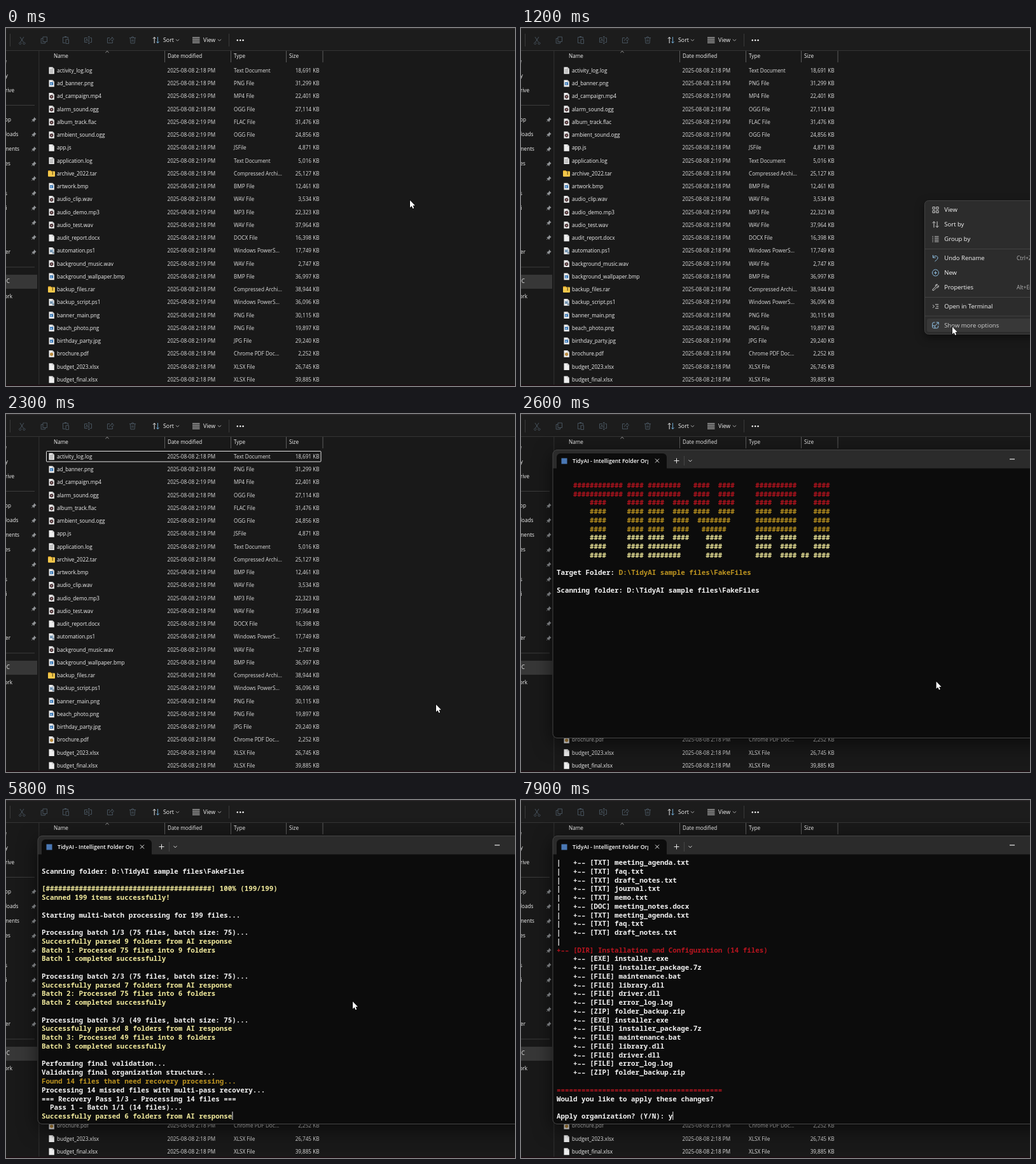
An HTML page with a canvas for the animation above (8000 ms loop, 800 by 563 pixels).

```html
<!DOCTYPE html>
<html lang="en">
<head>
<meta charset="utf-8">
<title>Folder organizer</title>
<style>
  html, body { margin: 0; width: 100%; height: 100%; overflow: hidden; background: #191919; }
  canvas { display: block; width: 800px; height: 563px; }
</style>
</head>
<body>
<canvas id="stage"></canvas>
<script>
const W = 800, H = 563, LOOP = 8000;
const UI = '"Open Sans", "Noto Sans", sans-serif';
const MONO = '"Noto Sans Mono", "DejaVu Sans Mono", monospace';
const canvas = document.getElementById('stage');
const ctx = canvas.getContext('2d');
const dpr = window.devicePixelRatio || 1;
canvas.width = W * dpr;
canvas.height = H * dpr;

// When things happen, in ms
const MENU_IN = 300, HOVER_IN = 1000, MENU_OUT = 2100;
const WINDOW_IN = 2400, TEXT_IN = 2500, BAR = [2700, 2880];
const PARSED = 5500, TREE = [6000, 6600], ANSWER = 7400;

// ---- drawing helpers ----
function rect(x, y, w, h, color) {
  ctx.fillStyle = color;
  ctx.fillRect(x, y, w, h);
}

function round(x, y, w, h, r, fill, stroke) {
  ctx.beginPath();
  ctx.roundRect(x, y, w, h, r);
  if (fill) { ctx.fillStyle = fill; ctx.fill(); }
  if (stroke) { ctx.strokeStyle = stroke; ctx.lineWidth = 1; ctx.stroke(); }
}

function path(d, color, width = 1, x = 0, y = 0) {
  ctx.save();
  ctx.translate(x, y);
  ctx.strokeStyle = color;
  ctx.lineWidth = width;
  ctx.stroke(new Path2D(d));
  ctx.restore();
}

function dot(x, y, r, color) {
  ctx.beginPath();
  ctx.arc(x, y, r, 0, Math.PI * 2);
  ctx.fillStyle = color;
  ctx.fill();
}

// y is the middle of the text line
function label(s, x, y, size = 8.2, color = '#f2f2f2', align = 'left', weight = 400) {
  ctx.font = `${weight} ${size}px ${UI}`;
  ctx.textAlign = align;
  ctx.fillStyle = color;
  ctx.fillText(s, x, y + size * 0.36);
}

const chevron = (x, y, color) => path('M-2.5,-1.2L0,1.3L2.5,-1.2', color, 1, x, y);

// ---- file list: name, minute, type, size in KB ----
const files = `activity_log.log|18|Text Document|18,691
ad_banner.png|18|PNG File|31,299
ad_campaign.mp4|19|MP4 File|22,401
alarm_sound.ogg|18|OGG File|27,114
album_track.flac|19|FLAC File|31,476
ambient_sound.ogg|19|OGG File|24,856
app.js|18|JSFile|4,871
application.log|19|Text Document|5,016
archive_2022.tar|18|Compressed Archi...|25,127
artwork.bmp|18|BMP File|12,461
audio_clip.wav|18|WAV File|3,534
audio_demo.mp3|19|MP3 File|22,323
audio_test.wav|18|WAV File|37,964
audit_report.docx|18|DOCX File|16,398
automation.ps1|18|Windows PowerS...|17,749
background_music.wav|19|WAV File|2,747
background_wallpaper.bmp|18|BMP File|36,997
backup_files.rar|18|Compressed Archi...|38,944
backup_script.ps1|19|Windows PowerS...|36,096
banner_main.png|18|PNG File|30,115
beach_photo.png|18|PNG File|19,897
birthday_party.jpg|19|JPG File|29,240
brochure.pdf|18|Chrome PDF Doc...|2,252
budget_2023.xlsx|18|XLSX File|26,745
budget_final.xlsx|18|XLSX File|39,885`.split('\n').map(s => s.split('|'));

function fileIcon(name, y) {
  const ext = name.split('.').pop();
  if (/tar|rar/.test(ext)) {
    round(66, y - 5, 5, 4, 1, '#d99a1e');
    round(66, y - 3.7, 11, 8.4, 1, '#f3c84b');
    rect(72.6, y - 3.7, 1.4, 5.5, '#7d6320');
    return;
  }
  ctx.fillStyle = '#eeeeee';
  ctx.fill(new Path2D(`M67.5,${y - 5.5}h5.7l2.6,2.6v8.2h-8.3z`));
  path(`M73,${y - 5.3}v2.5h2.6`, '#a8a8a8', 0.7);
  if (ext === 'log') {
    for (let i = 0; i < 4; i++) rect(69, y - 2.6 + i * 1.8, 5.2, 0.8, '#8a8a8a');
  } else if (/png|bmp|jpg/.test(ext)) {
    rect(69, y - 2, 5.2, 4.6, '#3b78b5');
    rect(70, y - 0.2, 2, 1.6, '#b9d8f0');
  } else if (/mp|ogg|flac|wav/.test(ext)) {
    dot(71.6, y + 0.6, 2.8, '#493236');
    dot(71.6, y + 0.6, 0.9, '#e8c4bc');
  } else if (ext === 'ps1') {
    rect(69, y - 2, 5.4, 4.4, '#8aa9c4');
    path(`M70,${y - 1}l1.6,1.3l-1.6,1.3`, '#33506b', 0.8);
    dot(74.4, y + 3, 1.7, '#7f95a8');
  } else if (ext === 'pdf') {
    dot(71.6, y + 0.6, 2.6, '#b8893c');
  }
}

function toolbar() {
  const dim = '#46525c', lit = '#e6e6e6';
  rect(0, 0, W, 36, '#1c1c1c');
  rect(0, 0, W, 1.4, '#2c292b');
  rect(0, 35, W, 1, '#343434');
  path('M-3,-5L2.2,3M3,-5L-2.2,3M-1.6,4a1.6,1.6 0 1 1-.1-.1M4.6,4a1.6,1.6 0 1 1-.1-.1', dim, 1, 25, 19);
  path('M-2,-5h6.5v7.5h-6.5zM-2,-2.5h-2.8v7.5h6.3v-2.5', dim, 1, 60, 19);
  path('M-1,4.5h-3.5v-9h8v3M-2,-5.5h3M0,-1h4.5v6.5h-4.5z', dim, 1, 94, 19);
  path('M-1,3.5h-4.5v-7h4.5M3,-3.5h2.5v7h-2.5M-3.6,2l1.8,-4l1.8,4M1.3,-5.5v11M0,-5.5h2.6M0,5.5h2.6', dim, 1, 129, 19);
  path('M-1,-3.5h-3.5v8h8v-2.5M-1.5,1.5q.5,-4 4,-4v-2.3l3,3.3l-3,3.2v-2', dim, 1, 164, 19);
  path('M-5,-3.5h10M-1.8,-3.6q0,-1.8 1.8,-1.8t1.8,1.8M-3.8,-3.4l.8,8.4h6l.8,-8.4M-1,-1v3.5M1,-1v3.5', dim, 1, 199, 19);
  for (const x of [6, 350]) rect(x, 9, 1, 20, '#3a3a3a');

  path('M-2.8,5v-9.5M-5,-2.2l2.2,-2.4l2.2,2.4', lit, 1, 236, 19);
  path('M2.5,-5v9.5M.3,2.4l2.2,2.4l2.2,-2.4', '#6fa8d0', 1, 236, 19);
  label('Sort', 247, 19, 8.8, '#f4f4f4');
  chevron(269.5, 19, '#aaa');
  for (let i = 0; i < 4; i++) rect(293, 14.5 + i * 2.7, 11.5, 1, lit);
  label('View', 310, 19, 8.8, '#f4f4f4');
  chevron(335.5, 19, '#aaa');
  for (const x of [363.8, 368.2, 372.6]) dot(x, 19.3, 1.2, '#fff');
}

// Visible right ends of the sidebar labels: text, right edge, y
const side = [['e', 1, 52], ['y', 3, 75], ['rive', 13, 98], ['op', 8, 144], ['loads', 19.5, 167],
  ['ments', 21, 190], ['es', 7, 213], ['s', 2, 260], ['i', 1.5, 283], ['er', 7, 352], ['C', 6, 398], ['ork', 10, 422]];

function sidebar() {
  rect(0, 388, 49, 22, '#373737');
  rect(0, 121, 45, 1, '#3c3c3c');
  rect(0, 375.5, 45, 1, '#3c3c3c');
  for (const [s, x, y] of side) label(s, x, y, 8.2, '#f2f2f2', 'right');
  for (let i = 0; i < 10; i++) {
    const y = 144 + i * 23.15;
    ctx.fillStyle = '#909396';
    ctx.fill(new Path2D(`M44,${y - 4}l3.6,3.6l-1.2,.6l-1.5,1.8l-.6,2l-4,-4l2,-.6l1.7,-1.6z`));
    path(`M42.5,${y + 1.3}L40.3,${y + 3.6}`, '#909396', 0.9);
  }
  rect(51.3, 36, 1, H - 36, '#333');
}

function explorer(t) {
  rect(0, 0, W, H, '#191919');
  toolbar();
  sidebar();
  [['Name', 75], ['Date modified', 254], ['Type', 358], ['Size', 445]].forEach(([s, x]) => label(s, x, 44.5));
  for (const x of [249, 353, 440, 497.5]) rect(x, 36, 1, 18, '#5c5c5c');
  path('M-2.6,1.3L0,-1.2L2.6,1.3', '#999', 1, 159, 37.5);
  files.forEach(([name, min, type, size], i) => {
    const y = 67 + i * 20.25;
    fileIcon(name, y);
    label(name, 80, y);
    label(`2025-08-08 2:${min} PM`, 253.5, y, 8.2, '#e0e0e0');
    label(type, 358, y, 8.2, '#e0e0e0');
    label(size + ' KB', 492.5, y, 8.2, '#e0e0e0', 'right');
  });
  if (t >= MENU_OUT) round(63.5, 58.5, 431.5, 16.5, 1, null, '#e4e4e4');
  rect(0, 561, W, 2, '#1d1014');
}

// ---- context menu ----
const menuItems = [
  ['View', 286, 'M-4.5,-4.5h3.4v3.4h-3.4zM1.2,-4.5h3.4v3.4h-3.4zM-4.5,1.2h3.4v3.4h-3.4zM1.2,1.2h3.4v3.4h-3.4z'],
  ['Sort by', 309, 'M-2.5,4.8v-9.3M-4.8,-2.2l2.3,-2.4l2.3,2.4M2.6,-4.8v9.3M.3,2.2l2.3,2.4l2.3,-2.4'],
  ['Group by', 332, 'M-1.5,-4h6.5M-1.5,-1.3h6.5M-1.5,1.4h6.5M-1.5,4h6.5M-5,-4h1.5M-5,-1.3h1.5M-5,1.4h1.5M-5,4h1.5'],
  ['Undo Rename', 362, 'M-4,-5v4.2h4.2M-4,-1c2,-3.5 8,-3.5 7.5,1c-.3,2 -2.5,3 -4.5,5', 'Ctrl+Z'],
  ['New', 385, 'M5,0a5,5 0 1 1 0,-.1M-2.4,0h4.8M0,-2.4v4.8'],
  ['Properties', 408, 'M-4.5,3L0,-1.2c-.8,-2.6 1,-4.2 3.2,-3.5l-1.8,2l1.6,1.5l2,-1.7c.5,2.2 -1.4,4 -3.6,3.2l-4.2,4.4q-2.4,.6 -1.7,-1.7', 'Alt+Enter'],
  ['Open in Terminal', 438, 'M-4.5,-2.5l2.6,2.3l-2.6,2.3M-.5,2.8h5.2M-.5,-3.2h5.2M1.2,-.2h3.5'],
  ['Show more options', 467.5, 'M-1,-4.5h-1.8q-2,0 -2,2v5q0,2 2,2h5q2,0 2,-2v-1.8M1.2,-4.6h3.6v3.6M4.7,-4.5L-.8,1M-4.5,.7h3.6v3.8']
];
const blueIcons = ['Undo Rename', 'New', 'Show more options'];

function contextMenu(t) {
  ctx.save();
  ctx.shadowColor = 'rgba(0,0,0,.5)';
  ctx.shadowBlur = 14 * dpr;
  ctx.shadowOffsetY = 5 * dpr;
  round(634.5, 271.5, 190, 210, 6, '#2c2c2c');
  ctx.restore();
  round(634.5, 271.5, 190, 210, 6, null, '#424242');
  if (t >= HOVER_IN) round(638, 457, 180, 21, 3, '#383838');
  for (const y of [347, 423, 452.5]) rect(635, y, 165, 1, '#424242');
  for (const [s, y, icon, key] of menuItems) {
    path(icon, blueIcons.includes(s) ? '#8fc0e4' : '#cfcfcf', 1, 651.5, y);
    label(s, 665.3, y, 9.5, s === 'Show more options' && t >= HOVER_IN ? '#d0d0d0' : '#f8f8f8');
    if (key) label(key, 779, y, 8.5, '#b4b4b4');
  }
}

// ---- terminal ----
const CELL = 6.51, LINE = 13.76, LEFT = 56, ROWS = 30;
const tint = { w: '#f2f2f2', y: '#f2eb9d', d: '#bd9420', r: '#b8141f' };
const FOLDER = 'D:\\TidyAI sample files\\FakeFiles';

const banner = [
  '    ############ #### ########   ####  ####     ##########    ####',
  '    ############ #### ########   ####  ####     ##########    ####',
  '        ####     #### ####  #### ####  ####     ####  ####    ####',
  '        ####     #### ####  #### ####  ####     ####  ####    ####',
  '        ####     #### ####  ####  ########      ##########    ####',
  '        ####     #### ####  ####   ######       ##########    ####',
  '        ####     #### ####  ####    ####        ####  ####    ####',
  '        ####     #### ########      ####        ####  ####    ####',
  '        ####     #### ########      ####        ####  #### ## ####'
].map((s, i) => 'rdy'[Math.floor(i / 3)] + s);

const batch = (n, size, parsed, made) => [
  `wProcessing batch ${n}/3 (${size} files, batch size: 75)...`,
  `ySuccessfully parsed ${parsed} folders from AI response`,
  `yBatch ${n}: Processed ${size} files into ${made} folders`,
  `yBatch ${n} completed successfully`, 'w'];

const BRANCH = '+–– ';
const notes = ['[TXT] meeting_agenda.txt', '[TXT] faq.txt', '[TXT] draft_notes.txt'];
const setup = ['[EXE] installer.exe', '[FILE] installer_package.7z', '[FILE] maintenance.bat', '[FILE] library.dll',
  '[FILE] driver.dll', '[FILE] error_log.log', '[ZIP] folder_backup.zip'];

// First letter of each line is its colour
const output = [
  'w', ...banner, 'w',
  'wTarget Folder:', 'w',
  'wScanning folder: ' + FOLDER, 'w',
  'y', 'yScanned 199 items successfully!', 'w',
  'wStarting multi-batch processing for 199 files...', 'w',
  ...batch(1, 75, 9, 9), ...batch(2, 75, 7, 6), ...batch(3, 49, 8, 8),
  'wPerforming final validation...',
  'wValidating final organization structure...',
  'dFound 14 files that need recovery processing...',
  'wProcessing 14 missed files with multi-pass recovery...',
  'w=== Recovery Pass 1/3 – Processing 14 files ===',
  'w  Pass 1 – Batch 1/1 (14 files)...',
  'ySuccessfully parsed 6 folders from AI response',
  ...[...notes, '[TXT] journal.txt', '[TXT] memo.txt', '[DOC] meeting_notes.docx', ...notes].map(s => 'w|   ' + BRANCH + s),
  'w|',
  'r' + BRANCH + '[DIR] Installation and Configuration (14 files)',
  ...[...setup, ...setup].map(s => 'w    ' + BRANCH + s),
  'w', 'r' + '='.repeat(40),
  'wWould you like to apply these changes?', 'w',
  'wApply organization? (Y/N): '
];
const TARGET_LINE = 11, BAR_LINE = 15, PARSED_LINE = 41, END = output.length - 1;

// Time and last printed line
const prints = [[TEXT_IN, 13], [BAR[0], 15], [2900, 16], [2950, 18], [3000, 20], [3130, 23], [3170, 25],
  [3280, 28], [3320, 30], [3420, 33], [3460, 36], [3500, 38], [3540, 39], [3570, 41]];

const progress = (t, [a, b]) => Math.min(1, Math.max(0, (t - a) / (b - a)));

function lastLine(t) {
  if (t >= TREE[0]) return PARSED_LINE + Math.ceil(progress(t, TREE) * (END - PARSED_LINE));
  let last = -1;
  for (const [at, n] of prints) if (t >= at) last = n;
  return last;
}

function lineText(i, t) {
  if (i === BAR_LINE) {
    const done = progress(t, BAR), n = Math.floor(done * 40);
    return `[${'#'.repeat(n)}${'-'.repeat(40 - n)}] ${Math.floor(done * 100)}% (${Math.floor(done * 199)}/199)`;
  }
  if (i === PARSED_LINE && t < PARSED) return '';
  return output[i].slice(1) + (i === END && t >= ANSWER ? 'y' : '');
}

function caretOn(t) {
  if (t < 3600 || (t >= TREE[0] && t < TREE[1])) return false;
  const start = t >= ANSWER ? ANSWER : t >= TREE[1] ? TREE[1] : t >= PARSED ? PARSED : 3870;
  return Math.floor((t - start) / 530) % 2 === 0;
}

function terminalText(t) {
  const last = lastLine(t), top = Math.max(0, last - ROWS + 1);
  ctx.font = `600 ${CELL / 0.6}px ${MONO}`;
  ctx.textAlign = 'left';
  for (let i = top; i <= last; i++) {
    const y = 102 + (i - top) * LINE;
    ctx.fillStyle = tint[output[i][0]];
    ctx.fillText(lineText(i, t), LEFT, y);
    if (i === TARGET_LINE) {
      ctx.fillStyle = tint.d;
      ctx.fillText(FOLDER, LEFT + 15 * CELL, y);
    }
  }
  if (caretOn(t)) rect(LEFT + lineText(last, t).length * CELL, 91 + (last - top) * LINE, 1, 13, '#f2f2f2');
}

function terminal(t) {
  ctx.save();
  ctx.shadowColor = 'rgba(0,0,0,.6)';
  ctx.shadowBlur = 30 * dpr;
  ctx.shadowOffsetY = 8 * dpr;
  round(50, 56.5, 800, 453, 7, '#0c0c0c');
  ctx.restore();
  round(50, 56.5, 800, 29, [7, 7, 0, 0], '#2b2b2b');
  round(56, 62, 173, 24, [6, 6, 0, 0], '#0c0c0c');
  round(50, 56.5, 800, 453, 7, null, '#454545');
  rect(63.5, 69.5, 9, 9, '#4a78b5');
  ctx.save();
  ctx.beginPath();
  ctx.rect(80, 62, 120, 24);
  ctx.clip();
  label('TidyAI - Intelligent Folder Organizer', 81, 74, 8.7, '#fff', 'left', 600);
  ctx.restore();
  path('M-3,-3L3,3M3,-3L-3,3', '#e8e8e8', 1, 214, 73.5);
  path('M-4,0H4M0,-4V4', '#e8e8e8', 1, 244.5, 73.5);
  rect(256, 66, 1, 15, '#454545');
  chevron(266, 73.5, '#e0e0e0');
  rect(768, 70.4, 8, 1.2, '#e8e8e8');
  terminalText(t);
}

// ---- mouse pointer: time, x, y ----
const track = [[0, 635, 271], [500, 635, 271], [1050, 678, 470], [1600, 678, 470], [1900, 676, 457],
  [2400, 676, 457], [2600, 653, 421], [2700, 622, 391], [3200, 545, 317], [LOOP, 545, 317]];

function pointer(t) {
  if (t >= ANSWER) return;
  const k = track.findIndex(p => p[0] > t);
  const [t0, x0, y0] = track[k - 1], [t1, x1, y1] = track[k];
  const u = (t - t0) / (t1 - t0);
  ctx.save();
  ctx.translate(x0 + (x1 - x0) * u, y0 + (y1 - y0) * u);
  const arrow = new Path2D('M0,0V11.4L2.6,9L4.4,13L6.2,12.2L4.5,8.3H8z');
  ctx.lineWidth = 1.2;
  ctx.strokeStyle = '#000';
  ctx.stroke(arrow);
  ctx.fillStyle = '#fff';
  ctx.fill(arrow);
  ctx.restore();
}

function draw(t) {
  ctx.setTransform(dpr, 0, 0, dpr, 0, 0);
  explorer(t);
  if (t >= MENU_IN && t < MENU_OUT) contextMenu(t);
  if (t >= WINDOW_IN) terminal(t);
  pointer(t);
}

const begin = performance.now();
function frame() {
  draw((performance.now() - begin) % LOOP);
  requestAnimationFrame(frame);
}
frame();
</script>
</body>
</html>
```
